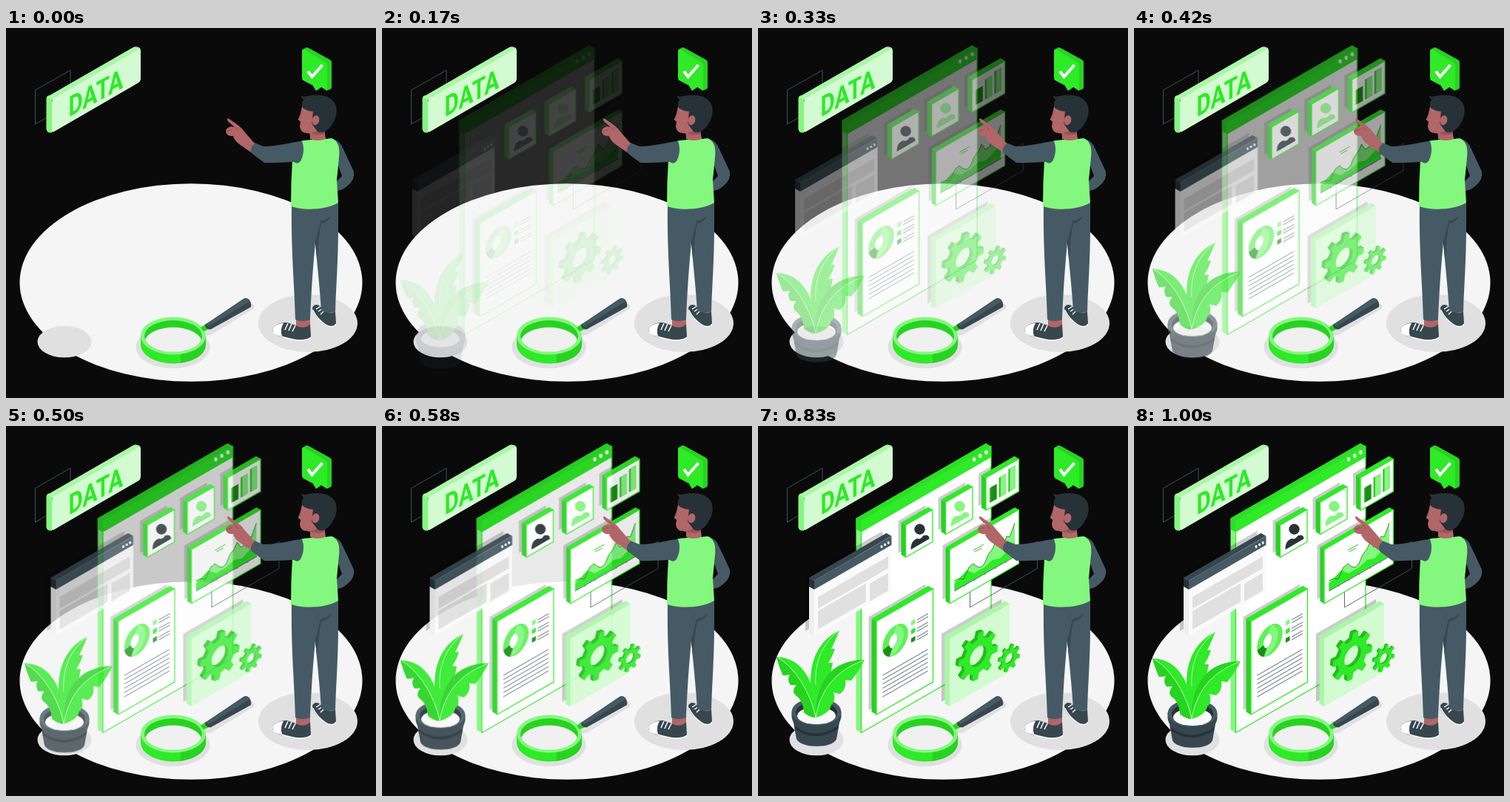
These frames come from a looping animation (500 px wide and 500 px high, 1.04 s). An HTML page:

```html
<!DOCTYPE html>
<html lang="en">
<head>
<meta charset="utf-8">
<title>Data dashboard</title>
<style>
  html, body { margin: 0; height: 100%; overflow: hidden; background: #0a0a0a; }
  svg { display: block; width: 100%; height: 100%; }
  .right, .up {
    animation: right 1s cubic-bezier(.36, -.01, .5, 1.38) paused both;
    animation-delay: calc(var(--t, 0) * -1s);
  }
  .up { animation-name: up; }
  @keyframes right { from { opacity: 0; transform: translateX(-30px); } to { opacity: 1; transform: none; } }
  @keyframes up { from { opacity: 0; transform: translateY(30px); } to { opacity: 1; transform: none; } }
  .main { fill: #2eea27; } .soft { fill: #2bdf25; } .deep { fill: #27d320; } .moss { fill: #25bb1f; }
  .forest { fill: #1c8c17; } .light { fill: #84f77f; } .mint { fill: #aaf7a7; } .pale { fill: #d3fbd1; }
  .slate { fill: #455a64; } .dark { fill: #37474f; } .ink { fill: #263238; }
  .skin { fill: #b16668; } .gray { fill: #e0e0e0; } .mist { fill: #f0f0f0; } .white { fill: #fff; }
  .shade { fill: #000; opacity: .2; }
  .edge { fill: none; stroke: #2eea27; stroke-width: 1.3; stroke-linejoin: round; }
  .thin { fill: none; stroke: #455a64; stroke-width: .9; }
  .vein { fill: none; stroke: #b9fbb6; stroke-width: 1; }
  .lace { fill: none; stroke: #fff; stroke-width: 1.5; }
  text { font: 700 38px Roboto, "Liberation Sans", sans-serif; }
</style>
</head>
<body>
<svg viewBox="0 0 500 500" preserveAspectRatio="none">
  <ellipse cx="250" cy="344" rx="231.5" ry="133.7" fill="#f5f5f5"/>
  <g class="gray">
    <ellipse cx="79" cy="424" rx="36.5" ry="21.3"/>
    <ellipse cx="408" cy="399" rx="67" ry="39"/>
    <ellipse cx="225.5" cy="431" rx="50" ry="29"/>
    <path d="M266 410L328 373C334 371 338 376 334 380L278 414C272 417 266 415 266 410Z"/>
  </g>

  <g id="panels"></g>

  <g id="sign">
    <path class="thin" d="M39.5 84L87 57V103L39.5 130Z"/>
    <path class="light" d="M54.5 96Q54.5 92 58 91L62 97V141.500Q54.500 142 54.500 136Z"/>
    <path class="mint" d="M55.500 93L172 26Q176 24 181 27L182 30L63 98Z"/>
    <path class="pale" d="M62 100Q62 97 65 95L179 29Q182 28 182 31V69Q182 72 179 74L65 140Q62 142 62 139Z"/>
    <text class="main" transform="matrix(.78 -.42 0 1 84.5 120.500)">DATA</text>
  </g>

  <g id="bubble">
    <path class="deep" d="M400 30L405 26.500Q407 26 409 27L438 43Q440 44 440 47V80Q440 82 438 83L432 85V52Z"/>
    <path class="main" d="M400 31Q400 28 403 29L431 46Q434 48 434 51V82Q434 85 431 83L426 80L419 85L414.500 77.500L402 71Q400 70 400 67Z"/>
    <path d="M408 58.500L413.500 66L427.500 50" fill="none" stroke="#fff" stroke-width="4"/>
  </g>

  <g id="lens">
    <path class="main" d="M182 416V428A44 25.400 0 0 0 270 428V416Z"/>
    <path class="deep" d="M236 436V452.700C256 450 270 440 270 428V416Z"/>
    <ellipse class="light" cx="226" cy="416" rx="44" ry="25.400"/>
    <ellipse class="deep" cx="226" cy="416.500" rx="39" ry="21.500"/>
    <path class="mist" d="M188 421.200A39 21.500 0 0 1 264 421.200A39 21.500 0 0 1 188 421.200Z"/>
    <path class="deep" d="M263 405L271 399L277 406L267 410Z"/>
    <path class="dark" d="M269 401L321 366C326 363 333 370 331 377L277 407C273 408 269 405 269 401Z"/>
    <path class="slate" d="M269 401L321 366Q326 363 330 369L274 403Z"/>
  </g>

  <g id="man">
    <path class="slate" d="M438 150C449 150 453 157 456 164L470 194C471 202 468 207 464 211C459 216 453 220 447 220V207L454 200L448 183Z"/>
    <path class="dark" d="M443 151Q450 158 452 169L449 186Z"/>
    <path class="skin" d="M426 380H445V389Q436 394 427 387ZM392 392H411V404Q400 409 392 402Z"/>
    <path class="dark" d="M414 378C416 372 423 373 428 379C434 386 440 387 445 383L446 399C445 404 436 405 430 400C423 394 414 387 414 378Z"/>
    <path class="lace" d="M414.500 381C419 390 426 397 432 401S444 404 446 400M419 380L425 376M422 383L428 379M425 387L430 382"/>
    <path class="dark" d="M360 408C362 400 372 398 380 398L392 402C400 407 408 404 411 400L412 417C410 423 397 423 385 420C374 419 362 416 360 408Z"/>
    <path class="white" d="M360 408C362 401 369 399 375 399Q370 407 373 416Q363 415 360 408Z"/>
    <path class="lace" d="M361 411C367 417 380 419 388 421S408 422 412 418M377 408L381 399M382 409L386 400M387 410L391 402"/>
    <path class="slate" d="M386 239C402 245 430 245 449 234V270C449 310 446 350 445 383Q435 387 426 382C424 350 420 315 418 290C414 330 412 370 411 394Q400 398 391 394C390 350 385 300 386 239Z"/>
    <path class="dark" d="M441 252Q433 260 425 261L418 291L420 310C422 290 424 272 426 264Q436 262 441 252Z"/>
    <path class="light" d="M398 153C408 150 430 151 440 149C448 152 451 160 450.500 171L447 205L449 236C434 246 402 247 385 241L385.500 209L387 178Z"/>
    <path class="slate" d="M400 153C386 154 368 160 348 160L333 154C329 160 329 167 333 170L349 182C362 183 378 181 389 181Q394 185 398 180C403 171 403 161 400 153Z"/>
    <path class="skin" d="M336 156L322 140C318 134 312 130 306 126L301 122.500C298 121 298 125 302 128L309 134C303 132 298 135 297 139Q297 145 304 146L307 146C309 153 315 157 321 161L331 168Q330 161 336 156Z"/>
    <path d="M309 134L314 139M298 140L306 137" fill="none" stroke="#8f4a4e"/>
    <path class="skin" d="M400 106L398 116L394.500 124L398 126.500L397 133Q398 142 407 142L411 143V150Q421 154 432 150L430 135L421 108Z"/>
    <path d="M396 122Q397 122 398 120" fill="none" stroke="#8f4a4e"/>
    <path fill="#9a5256" d="M411 142Q420 141 426 134L431 138V143Q420 147 411 142Z"/>
    <path class="ink" d="M402 97L398 91Q403 94 407 92C419 90 430 90 438 95C449 102 449 117 442 128C436 139 427 144 421 140L413 129L415 113Q406 112 401 108Q398 103 402 97Z"/>
    <ellipse class="skin" cx="418.500" cy="124.500" rx="5" ry="6.500" transform="rotate(15 418 124)"/>
  </g>

  <g id="plant" class="up">
    <path class="dark" d="M46 392L52 425C58 438 101 438 106 425L112 392Z"/>
    <path class="dark" d="M45.500 388V395C49 422 109 422 112.500 395V388Z"/>
    <path class="ink" d="M49 407Q78 428 109 407L108 411Q78 431 50 411Z"/>
    <ellipse class="slate" cx="79" cy="388" rx="33.500" ry="18.500"/>
    <ellipse class="ink" cx="79" cy="389" rx="28" ry="14.500"/>
    <ellipse cx="79" cy="393.500" rx="26" ry="11.500" fill="#fafafa"/>
    <path class="main" d="M78 390C66 350 66 300 110 278Q105 291 99 303H104Q101 313 95 322H101Q98 342 88 362Z"/>
    <path class="main" d="M78 396C80 350 60 314 25 314C28 325 31 333 34 339L43 338Q39 345 44 352L52 352Q45 360 51 366C58 370 62 380 62 389Q70 396 78 396Z"/>
    <path class="deep" d="M78 396C73 370 55 332 25 314C28 325 31 333 34 339L43 338Q39 345 44 352L52 352Q45 360 51 366C58 370 62 380 62 389Q70 396 78 396Z"/>
    <path class="main" d="M78 396C77 350 98 318 144 318C138 330 131 340 126 346L118 345Q120 357 111 364L102 362Q106 373 99 379Q97 390 78 396Z"/>
    <path class="deep" d="M78 396C77 350 98 318 144 318C106 332 84 358 78 396Z"/>
    <path class="vein" d="M78 396C73 370 55 332 27 315M78 396C84 358 106 332 142 319M78 352C76 320 88 295 109 279"/>
  </g>
</svg>
<script>
  const K = .577;
  const path = (cls, d) => `<path class="${cls}" d="${d}"/>`;
  const slab = (x, y, w, h) => `M${x} ${y}l${w} ${-w * K}v${h}l${-w} ${w * K}z`;
  const quad = (cls, ...a) => path(cls, slab(...a));
  const side = (cls, x, y, h, d) => path(cls, `M${x} ${y}l${-d} ${-d * K}v${h}l${d} ${d * K}z`);
  const lid = (cls, x, y, w, d) => path(cls, `M${x} ${y}l${w} ${-w * K}l${-d} ${-d * K}l${-w} ${w * K}z`);
  const shadow = (x, y, w, h, d) => quad('shade', x - d, y - d * K, w, h);
  const slide = s => `<g class="right">${s}</g>`;
  const iso = (x, y, s) => `<g transform="matrix(.866 -.5 0 1 ${x} ${y})">${s}</g>`;
  const dots = (x, y, step, r) => [0, 1, 2].map(i =>
    `<ellipse class="white" cx="${x + i * step}" cy="${y - i * step * K}" rx="${r}" ry="${r * 1.3}"/>`).join('');

  const box = (x, y, w, h, d = 6) => shadow(x, y, w, h, d + 4) + side('deep', x, y, h, d) +
    lid('main', x, y, w, d) + quad('white', x, y, w, h) + quad('edge', x, y, w, h);

  const board = () => {
    const [x, y, w, h] = [137.5, 128.5, 175.5, 286];
    return side('light', x, y, h, 7) + side('soft', x, y, 15, 7) + lid('soft', x, y, w, 7) +
      quad('white', x, y, w, h) + quad('main', x, y, w, 15) +
      quad('edge', x, y, w, h) + dots(290, 45, 8.2, 2.2);
  };

  const browser = () => {
    const [x, y, w, h] = [74, 209, 104.5, 75];
    return shadow(x, y, w, h, 12) + side('mist', x, y, h, 7) + side('ink', x, y, 12, 7) +
      lid('dark', x, y, w, 7) + `<path fill="#fafafa" d="${slab(x, y, w, h)}"/>` +
      quad('slate', x, y, w, 12) + quad('gray', 79, 231, 95, 16) +
      quad('gray', 79, 250, 65, 25) + quad('gray', 149, 213, 25, 24) + dots(165, 163, 4.6, 1.5);
  };

  const person = (x, y, cls) => box(x, y, 36.5, 43.5) +
    path(cls, `M${x + 7} ${y + 33}c0-9 3-13 9-15q4 2 8-4q8-2 8 4.600z`) +
    `<circle class="${cls}" cx="${x + 19}" cy="${y + 5.5}" r="7.2"/>`;

  const bars = () => box(306, 70, 44.5, 44) +
    [['forest', 20], ['light', 27], ['light', 31]].map(([cls, h], i) => {
      const x = 311 + i * 12.7, y = 104 - i * 7.3 - h;
      return quad('moss', x, y, 9.5, h) + quad(cls, x + 2, y - 2 * K, 7.5, h);
    }).join('');

  const chart = () => {
    const back = 'M263.500 209L270 206L276 207L283 191L289 186L294 190L299 191L304 186L309 174L315 166L319 157L324 164L330 160L334 149L338 150L341 142L345 131';
    const front = 'M263.500 213L280 195L290 199L304 191L315 181L325 179L338 165L345 157';
    const base = 'V176L263.500 223Z';
    return box(257, 167, 93.5, 73, 5.5) + path('light', back + base) + path('main', front + base) +
      `<path d="${back}" fill="none" stroke="#1c8c17" stroke-width=".9"/>` +
      path('thin', 'M263.500 223L346 176M277 215v2M291 207v2M305 199v2M319 191v2M333 183v2') +
      `<path d="M289 168l14-8M291 170l9-5" fill="none" stroke="#27c321"/>`;
  };

  const doc = () => {
    let s = box(158, 264, 76.5, 126, 6.5);
    s += iso(183.5, 289.5, `<g fill="none" stroke-width="10">
      <circle r="15" stroke="#5ef058"/>
      <path d="M0-15A15 15 0 0 1-7 13.200" stroke="#84f77f"/>
      <path d="M-7 13.200A15 15 0 0 1-14.600 3" stroke="#1c8c17"/></g>`);
    ['light', 'main', 'forest'].forEach((cls, i) => {
      const y = 264 + i * 11.5;
      s += quad(cls, 205, y, 5.5, 6) + path('thin', `M213 ${y - 2}l15-8.500M213 ${y + 2}l15-8.500`);
    });
    for (let i = 0; i < 6; i++) s += path('thin', `M166.500 ${337 + i * 5.8}l61-35.200`);
    return s;
  };

  const gear = (x, y, n, R, r, hole, turn, depth) => {
    let d = '';
    for (let i = 0; i < n; i++)
      [[-.27, r], [-.17, R], [.17, R], [.27, r]].forEach(([a, q]) => {
        const t = (i + a + turn) / n * 2 * Math.PI;
        d += `${d ? 'L' : 'M'}${(q * Math.cos(t)).toFixed(1)} ${(q * Math.sin(t)).toFixed(1)}`;
      });
    d += `ZM${hole} 0A${hole} ${hole} 0 1 0 ${-hole} 0A${hole} ${hole} 0 1 0 ${hole} 0Z`;
    let s = '';
    for (let k = depth; k >= 0; k--)
      s += iso(x - k, y - k * K, `<path class="${k ? 'moss' : 'main'}" fill-rule="evenodd" d="${d}"/>`);
    return s;
  };

  const gears = () => {
    const [x, y, w, h] = [257, 287, 81, 92];
    return shadow(x, y, w, h, 11) + side('mint', x, y, h, 6.5) + lid('mint', x, y, w, 6.5) +
      quad('pale', x, y, w, h) +
      gear(295.5, 311, 8, 31, 23, 13, .2, 4) + gear(338, 314, 8, 17, 12, 6.5, .4, 2);
  };

  const frame = path('thin', slab(284.5, 208.5, 91, 36.5));

  document.getElementById('panels').innerHTML = [
    board(), frame, browser(), person(197.5, 134, 'ink'), person(251.5, 103, 'light'),
    bars(), chart(), doc(), gears()
  ].map(slide).join('');

  // The motion advances in 24 held poses per second.
  const LOOP = 1040, FPS = 24, start = performance.now();
  const tick = () => {
    const t = (performance.now() - start) % LOOP;
    const pose = Math.min(24, Math.floor((t + 4) * FPS / 1000));
    document.documentElement.style.setProperty('--t', pose ? (pose + .5) / FPS : 0);
    requestAnimationFrame(tick);
  };
  tick();
</script>
</body>
</html>
```
